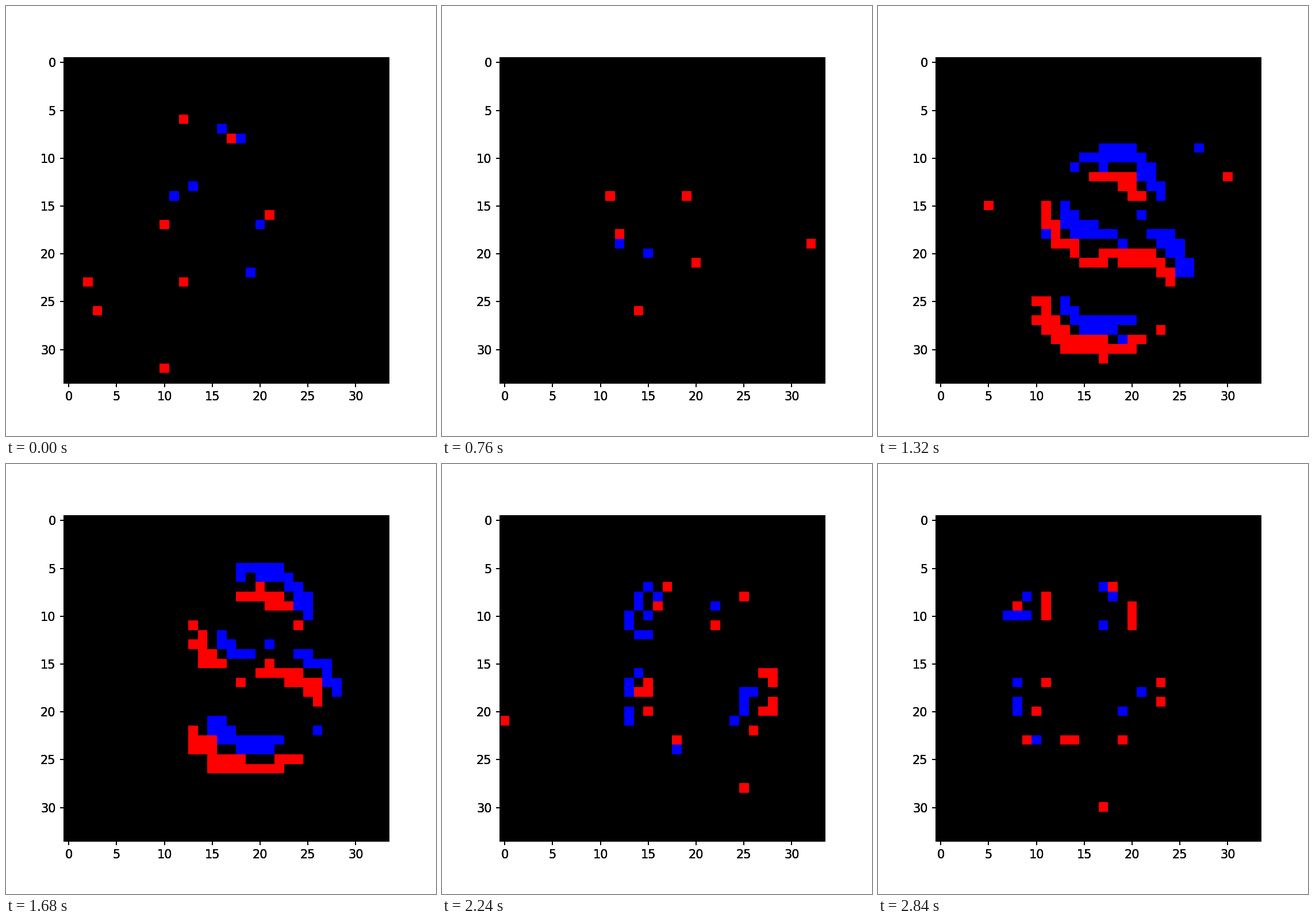
A matplotlib script for the animation above (2880 ms loop, 748 px wide and 748 px high).

```python
import numpy as np
import matplotlib.pyplot as plt
from matplotlib.animation import FuncAnimation

SIDE, DPI = 748, 150
GRID, FRAMES, STEP = 34, 72, 40
SIGMA, LIMIT = 1.1, 0.11
RED, BLUE = (255, 0, 0), (0, 0, 255)

# The sensor walks round a triangle in three eased saccades
CORNERS = np.array([(-0.9, -0.4), (1.6, 6.4), (5.4, 0.1)])
SPANS = [(2, 20), (27, 47), (50, 77)]

rows, cols = np.mgrid[:GRID, :GRID].astype(float)


def loop(cx, cy, rx, ry, lean):
    a = np.linspace(0, 2 * np.pi, 90, endpoint=False)
    y = ry * np.sin(a)
    return np.stack([cx + rx * np.cos(a) - lean * y, cy + y], axis=1)


# Digit 8 as two leaning ellipses
eight = np.vstack([loop(14.4, 9.8, 4.6, 4.3, 0.1),
                   loop(15.7, 18.7, 6.4, 4.9, 0.25)])


def offset(t):
    pos = CORNERS[0].copy()
    for k, (start, end) in enumerate(SPANS):
        u = np.clip((t - start) / (end - start), 0, 1)
        pos += (CORNERS[(k + 1) % 3] - CORNERS[k]) * u * u * (3 - 2 * u)
    return pos


def brightness(t):
    x, y = (eight + offset(t)).T
    gap = (cols[..., None] - x) ** 2 + (rows[..., None] - y) ** 2
    return np.exp(-gap.min(axis=-1) / (2 * SIGMA ** 2))


def events(frame):
    rng = np.random.default_rng(500 + frame)
    light = brightness(frame)
    change = brightness(frame + 0.5) - brightness(frame - 0.5)
    limit = LIMIT * rng.uniform(0.7, 1.4, change.shape)
    stray = rng.random(change.shape)
    noise = 0.025 * light
    img = np.zeros((GRID, GRID, 3), np.uint8)
    img[(change < -limit) | (stray < 0.002 + noise)] = RED
    img[(change > limit) | (stray > 0.9995 - noise)] = BLUE
    return img


# A hair over the stage size, so that truncation gives whole pixels
size = (SIDE + 0.01) / DPI
fig = plt.figure(figsize=(size, size), dpi=DPI, facecolor="white")
box = [101 / SIDE, 92.2 / SIDE, 565.4 / SIDE, 565.8 / SIDE]
ticks = range(0, 31, 5)

# Stacked copies of the frame give the heavy edges of lines and labels
layers = [fig.add_axes(box, facecolor=face, label=f"layer {k}")
          for k, face in enumerate(["black", "none", "none"])]
image = layers[0].imshow(events(0), interpolation="nearest", aspect="auto",
                         extent=(-0.52, 33.48, 33.425, -0.575))
for ax in layers:
    ax.set(xlim=(-0.5, 33.5), ylim=(33.5, -0.5), xticks=ticks, yticks=ticks)


def update(frame):
    image.set_data(events(frame))
    return [image]


anim = FuncAnimation(fig, update, frames=FRAMES, interval=STEP,
                     init_func=lambda: update(0), repeat=True, repeat_delay=0)
plt.show()
```
